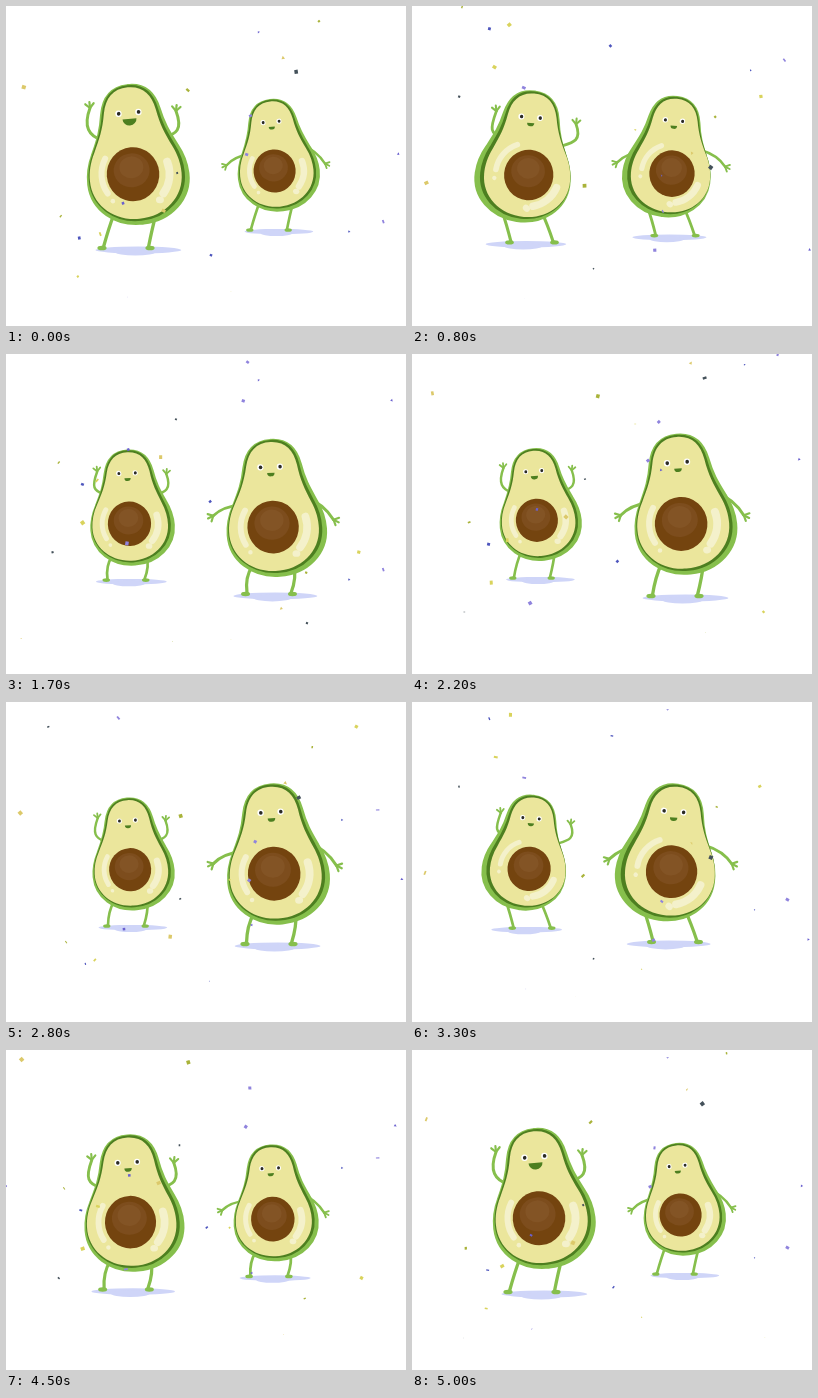
Recreate the animation shown at these times as an HTML page with a canvas. Size 400x320 px, loop 5100 ms.

```html
<!DOCTYPE html>
<html lang="en">
<head>
<meta charset="utf-8">
<title>Dancing avocados</title>
<style>
  html, body { margin: 0; width: 100%; height: 100%; overflow: hidden; background: #fff; }
  canvas { display: block; width: 100vw; height: 100vh; }
</style>
</head>
<body>
<canvas id="stage"></canvas>
<script>
const W = 400, H = 320, LOOP = 5100, STEP = 100, DANCE = 2550;
const LIGHT = '#86bf4c', DARK = '#4d7f20', FLESH = '#ebe69c', SHINE = '#f4f1cb';
const RAD = Math.PI / 180;
const canvas = document.getElementById('stage');
const ctx = canvas.getContext('2d');
const dpr = window.devicePixelRatio || 1;
canvas.width = W * dpr;
canvas.height = H * dpr;

const ease = (v, a, b) => {
  const x = Math.min(1, Math.max(0, (v - a) / (b - a)));
  return x * x * (3 - 2 * x);
};

// Pose values: belly x, belly y, tilt, skin swing, shine turn, pit shift, hips x
const REST = [5, -68.5, -2.2, -1.9, 0, -0.8, 4];
const RIGHT = [9.5, -74, -5.2, -1.6, 0, -2.5, 9];
const LEFT = [-5, -72, 4.8, 3.2, 35, 1.5, -10.5];

// Hands are [left x, left y, right x, right y]
const dancers = [
  { x: 120, wave: true, arms: [-34, -38, 35, -34],
    rest: [-35, -135, 49, -132], right: [-36, -143, 50, -140], left: [-38, -143, 47, -129] },
  { x: 263, wave: false, arms: [-36, -24, 37, -30],
    rest: [-57, -80, 66, -76], right: [-53, -81, 70, -83], left: [-67, -85, 58, -80] }
];

const blend = (rest, right, left, r, l) =>
  rest.map((v, i) => v + (right[i] - v) * r + (left[i] - v) * l);

const body = new Path2D();
for (const k of [1, -1]) {
  body.moveTo(0, -87);
  body.bezierCurveTo(15 * k, -87, 23 * k, -78, 26 * k, -63);
  body.bezierCurveTo(29 * k, -46, 33 * k, -38, 39 * k, -25);
  body.bezierCurveTo(44 * k, -15, 46 * k, -6, 46 * k, 3);
  body.bezierCurveTo(46 * k, 27, 26 * k, 45, 0, 45);
}

function oval(x, y, rx, ry, fill) {
  ctx.fillStyle = fill;
  ctx.beginPath();
  ctx.ellipse(x, y, rx, ry, 0, 0, 7);
  ctx.fill();
}

function curve(x0, y0, cx, cy, x1, y1, width) {
  ctx.lineWidth = width;
  ctx.beginPath();
  ctx.moveTo(x0, y0);
  ctx.quadraticCurveTo(cx, cy, x1, y1);
  ctx.stroke();
}

// One coat of the fruit, swung around the top of the head
function layer(swing, scale, grow, color) {
  ctx.save();
  ctx.translate(0, -80);
  ctx.rotate(swing * RAD);
  ctx.scale(scale, (1 + scale) / 2);
  ctx.translate(0, 80);
  ctx.fillStyle = ctx.strokeStyle = color;
  ctx.fill(body);
  if (grow) {
    ctx.lineWidth = grow * 2;
    ctx.stroke(body);
  }
  ctx.restore();
}

function shineArc(from, to, width) {
  ctx.lineWidth = width;
  ctx.beginPath();
  ctx.arc(0, 0, 34, from * RAD, to * RAD);
  ctx.stroke();
}

function hand(x, y, angle) {
  ctx.lineWidth = 2.2;
  for (const spread of [-0.8, 0, 0.75]) {
    ctx.beginPath();
    ctx.moveTo(x, y);
    ctx.lineTo(x + Math.cos(angle + spread) * 6, y + Math.sin(angle + spread) * 6);
    ctx.stroke();
  }
}

function drawArms(d, hands, bx, by, tilt) {
  for (const i of [0, 2]) {
    const k = i ? 1 : -1;
    const sx = bx + d.arms[i] - d.arms[i + 1] * tilt;
    const sy = by + d.arms[i + 1] + d.arms[i] * tilt;
    const x = hands[i], y = hands[i + 1];
    if (d.wave) {
      ctx.lineWidth = 3;
      ctx.beginPath();
      ctx.moveTo(sx - k * 4, sy + 1);
      ctx.bezierCurveTo(sx + k * 9, sy - 3, x + k * 7, y + 22, x, y + 3);
      ctx.stroke();
      hand(x, y + 3, -Math.PI / 2 + k * 0.1);
    } else {
      curve(sx - k * 4, sy, (sx + x) / 2 + k * 3, (sy + y) / 2 - 4, x, y, 3);
      hand(x, y, Math.PI / 2 - k * 1.1);
    }
  }
}

function drawFace(mouth, blink) {
  if (!blink) {
    for (const x of [-11.5, 8.5]) {
      oval(x, -61.5, 3.2, 3.2, '#fff');
      oval(x + 0.2, -61.5, 1.8, 1.9, '#2b2b25');
    }
  }
  ctx.fillStyle = DARK;
  ctx.beginPath();
  ctx.ellipse(-1, -55.5, mouth, mouth * 0.95, 0, 0, Math.PI);
  ctx.fill();
}

function drawDancer(d, s, r, l, blink) {
  const [bx, by, deg, swing, turn, pit, hips] = blend(REST, RIGHT, LEFT, r, l);
  const tilt = deg * RAD;
  ctx.save();
  ctx.translate(d.x, 152 + 90 * s);
  ctx.scale(s, s);

  oval(bx * 1.3, 2, 43, 3.4, '#cfd5f8');
  oval(bx * 1.3 - 3, 4, 20, 3.6, '#cfd5f8');

  ctx.strokeStyle = LIGHT;
  ctx.lineCap = 'round';
  const bend = 5 * (1 - r) * (1 - l);
  for (const k of [-1, 1]) {
    const x = hips + 21 * k, y = by + 40, foot = 22.5 * k;
    curve(x, y, (x + foot) / 2 + k * bend, y / 2 - 3, foot, -1, 3.3);
    oval(24 * k, 0, 4.6, 2.3, LIGHT);
  }
  drawArms(d, blend(d.rest, d.right, d.left, r, l), bx, by, tilt);

  ctx.translate(bx, by);
  ctx.rotate(tilt);
  layer(swing, 1.05, 3, LIGHT);
  layer(swing * 0.45, 1, 2.2, DARK);
  layer(0, 1, 0, FLESH);

  ctx.save();
  ctx.rotate(turn * RAD);
  ctx.strokeStyle = SHINE;
  shineArc(150, 212, 6);
  shineArc(-16, 40, 8);
  oval(22, 28, 4, 3.4, SHINE);
  oval(-25, 25, 2.3, 2.3, SHINE);
  ctx.restore();

  oval(pit, 0, 26.3, 27, '#74440f');
  oval(pit - 1, -4, 18, 17, '#7d4d1d');
  oval(pit - 1, -7, 12, 11, '#835425');
  drawFace(d.wave ? 3.8 + 3.2 * r ** 4 : 3.8, blink);
  ctx.restore();
}

// Seeded confetti, spread evenly across the stage
let seed = 90210;
const rnd = () => (seed = (seed * 16807) % 2147483647) / 2147483647;
const COLORS = ['#6a60cf', '#8f83dd', '#d9d35c', '#4d55bd', '#a9b33a', '#44515a', '#dcc96a'];
const confetti = Array.from({ length: 24 }, (_, i) => ({
  x: 5 + (i * 0.618 % 1) * 385,
  start: rnd(),
  falls: 2 + Math.floor(rnd() * 2),
  drift: (rnd() - 0.5) * 50,
  size: rnd() < 0.08 ? 6 : 1.8 + rnd() * 2.2,
  spin: 2 + Math.floor(rnd() * 6),
  tri: rnd() < 0.2,
  color: COLORS[i % COLORS.length]
}));

function drawConfetti(u) {
  for (const c of confetti) {
    const p = (u * c.falls + c.start) % 1;
    const a = (p * c.spin + c.start) * Math.PI * 2;
    const size = c.size * Math.min(1, (1 - p) * 6);
    ctx.save();
    ctx.translate(c.x + c.drift * p + Math.sin(a) * 3, -8 + 305 * p);
    ctx.rotate(a);
    ctx.scale(1, 0.3 + 0.7 * Math.abs(Math.cos(a * 1.5)));
    ctx.fillStyle = c.color;
    ctx.beginPath();
    ctx.moveTo(-size / 2, size / 2);
    ctx.lineTo(size / 2, size / 2);
    if (c.tri) {
      ctx.lineTo(0, -size / 2);
    } else {
      ctx.lineTo(size / 2, -size / 2);
      ctx.lineTo(-size / 2, -size / 2);
    }
    ctx.fill();
    ctx.restore();
  }
}

function draw(t) {
  ctx.setTransform(dpr, 0, 0, dpr, 0, 0);
  ctx.fillStyle = '#fff';
  ctx.fillRect(0, 0, W, H);
  const swap = ease(t, 0, 2150) - ease(t, 2850, 5000);
  const u = (t % DANCE) / DANCE;
  const r = 1 - ease(u, 0.02, 0.15) + ease(u, 0.7, 0.96);
  const l = ease(u, 0.15, 0.27) - ease(u, 0.31, 0.5);
  drawDancer(dancers[0], 1 - 0.2 * swap, r, l, t >= 3950 && t < 4100);
  drawDancer(dancers[1], 0.8 + 0.2 * swap, r, l, false);
  drawConfetti(t / LOOP);
}

const began = performance.now();
function tick() {
  const t = (performance.now() - began) % LOOP;
  draw(Math.floor(t / STEP) * STEP);
  requestAnimationFrame(tick);
}
tick();
</script>
</body>
</html>
```
